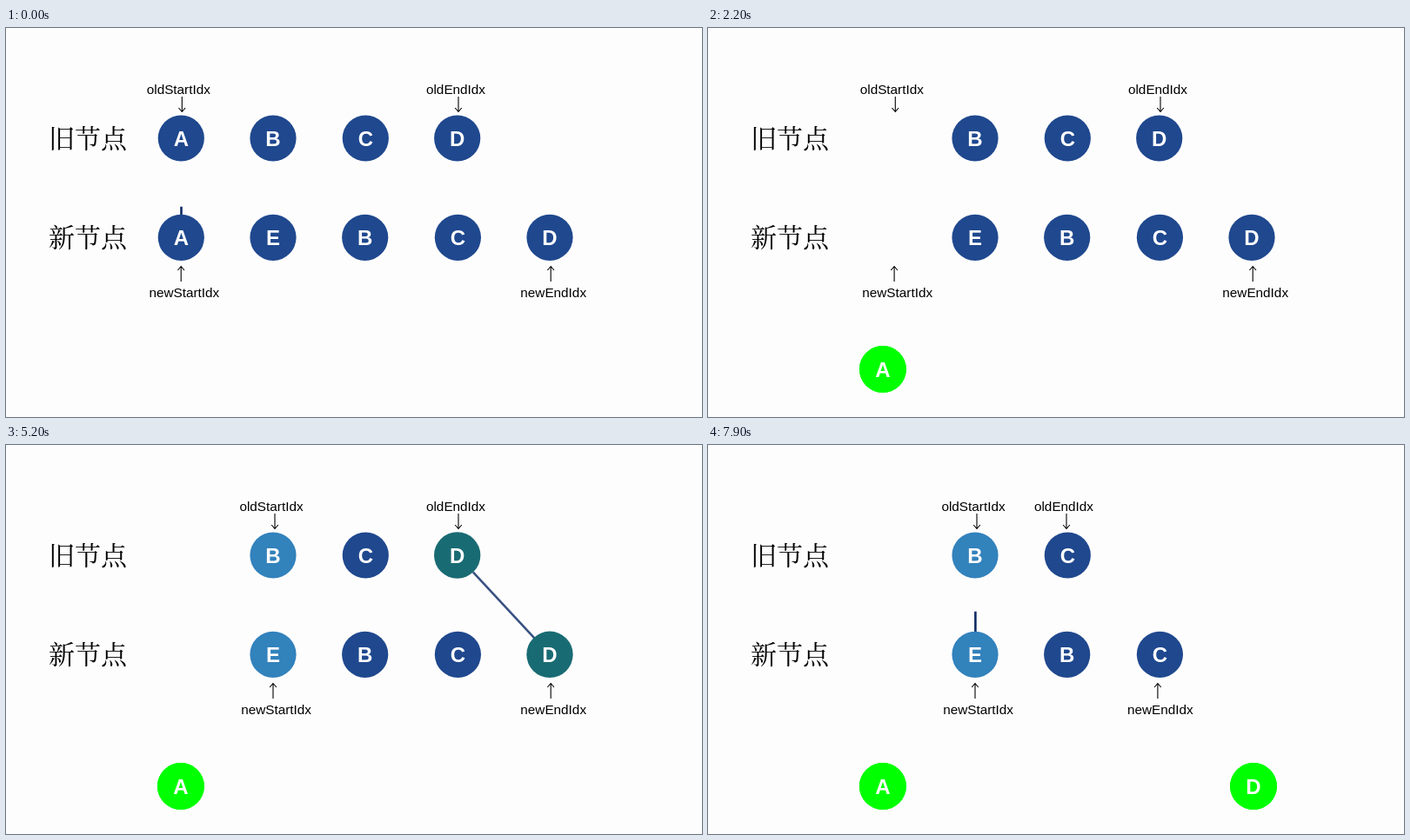
Recreate the animation shown at these times as an HTML page. Size 800 by 448 pixels, loop 8 s.

```html
<!DOCTYPE html>
<html lang="zh">
<head>
<meta charset="utf-8">
<style>
  html, body { margin: 0; width: 100%; height: 100%; overflow: hidden; background: #fefdfe; }
  svg { display: block; width: 800px; height: 448px; }
  .title { font: 30px "Noto Serif CJK SC", "Songti SC", "Noto Serif", "Noto Sans CJK SC", serif; }
  .label { font: 15.3px "Liberation Sans", Arial, sans-serif; text-anchor: middle; }
  .letter { font: bold 24px "Liberation Sans", Arial, sans-serif; text-anchor: middle; fill: #fff; }
  .link { stroke: #0b2a63; stroke-width: 2.6; }
  .arrow { fill: none; stroke: #000; stroke-width: 1.1; }
</style>
</head>
<body>
<svg id="stage" viewBox="0 0 800 448">
  <text class="title" x="49" y="138">旧节点</text>
  <text class="title" x="49" y="252">新节点</text>
</svg>
<script>
const LOOP = 8000, STEP = 100;
const BLUE = [31, 72, 142], LIGHT = [50, 130, 188], GREEN = [0, 255, 0];
const OLD_Y = 127, NEW_Y = 241.3, DONE_Y = 393, R = 26.6;
const stage = document.getElementById("stage");

function add(parent, tag, attrs, text) {
  const el = document.createElementNS("http://www.w3.org/2000/svg", tag);
  for (const key in attrs) el.setAttribute(key, attrs[key]);
  if (text) el.textContent = text;
  return parent.appendChild(el);
}

const mix = (a, b, p) => a + (b - a) * p;
const linear = (t, start, length) => Math.min(1, Math.max(0, (t - start) / length));
const ease = (t, start, length) => (1 - Math.cos(Math.PI * linear(t, start, length))) / 2;

function makeLink(from, to, start, fade) {
  const dx = to[0] - from[0], dy = to[1] - from[1], d = Math.hypot(dx, dy);
  const at = s => [from[0] + dx * s / d, from[1] + dy * s / d];
  const [x1, y1] = at(R - 1);
  const el = add(stage, "line", { class: "link", x1, y1 });
  return t => {
    const [x2, y2] = at(mix(R, d - R, ease(t, start, 500)));
    el.setAttribute("x2", x2);
    el.setAttribute("y2", y2);
    el.setAttribute("opacity", t < start ? 0 : 1 - linear(t, fade, 500));
  };
}

function makeNode(letter, x, y, change) {
  const g = add(stage, "g", {});
  const disc = add(g, "circle", { r: R });
  add(g, "text", { class: "letter", y: 9 }, letter);
  return t => {
    let px = x, py = y, fill = BLUE, r = R;
    if (change) {
      const c = linear(t, change.tint, 500);
      fill = BLUE.map((v, i) => Math.round(mix(v, change.color[i], c)));
      if (change.move) {
        const p = ease(t, change.move, 1000);
        px = mix(x, change.x, p);
        py = mix(y, DONE_Y, p);
        r = mix(R, 27, c);
      }
    }
    disc.setAttribute("r", r);
    disc.setAttribute("fill", `rgb(${fill})`);
    g.setAttribute("transform", `translate(${px} ${py})`);
  };
}

function makePointer(name, textX, arrowX, isOld, shift, start) {
  const g = add(stage, "g", {});
  add(g, "text", { class: "label", x: textX, y: isOld ? 75.7 : 309.7 }, name);
  const d = isOld
    ? `M${arrowX} 79V96.5m-3.8-4.5l3.8 4.5l3.8-4.5`
    : `M${arrowX} 292V274.5m-3.8 4.5l3.8-4.5l3.8 4.5`;
  add(g, "path", { class: "arrow", d });
  return t => g.setAttribute("transform", `translate(${shift * ease(t, start, 1000)} 0)`);
}

const doneA = { color: GREEN, tint: 405, move: 955, x: 200.9 };
const doneD = { color: GREEN, tint: 5105, move: 5645, x: 627 };
const skipped = { color: LIGHT, tint: 4060 };

const parts = [
  makeLink([201.5, NEW_Y], [201.5, OLD_Y], -125, 405),
  makeLink([307.4, NEW_Y], [307.4, OLD_Y], 2990, 3530),
  makeLink([625, NEW_Y], [518.7, OLD_Y], 4585, 5105),
  makeLink([307.4, NEW_Y], [307.4, OLD_Y], 7690, 9000),
  makeNode("A", 201.3, OLD_Y, doneA),
  makeNode("B", 307, OLD_Y, skipped),
  makeNode("C", 413.3, OLD_Y),
  makeNode("D", 518.7, OLD_Y, doneD),
  makeNode("A", 201.3, NEW_Y, doneA),
  makeNode("E", 307, NEW_Y, skipped),
  makeNode("B", 412.7, NEW_Y),
  makeNode("C", 519.4, NEW_Y),
  makeNode("D", 625, NEW_Y, doneD),
  makePointer("oldStartIdx", 198.3, 202.3, true, 106.7, 1973),
  makePointer("newStartIdx", 204.8, 201.2, false, 105.8, 1973),
  makePointer("oldEndIdx", 517, 520, true, -108, 6690),
  makePointer("newEndIdx", 629.2, 626.2, false, -109.3, 6690)
];

const begin = performance.now();
function draw() {
  const now = Math.max(0, performance.now() - begin) % LOOP;
  const t = Math.floor(now / STEP) * STEP;
  parts.forEach(update => update(t));
  requestAnimationFrame(draw);
}
draw();
</script>
</body>
</html>
```
